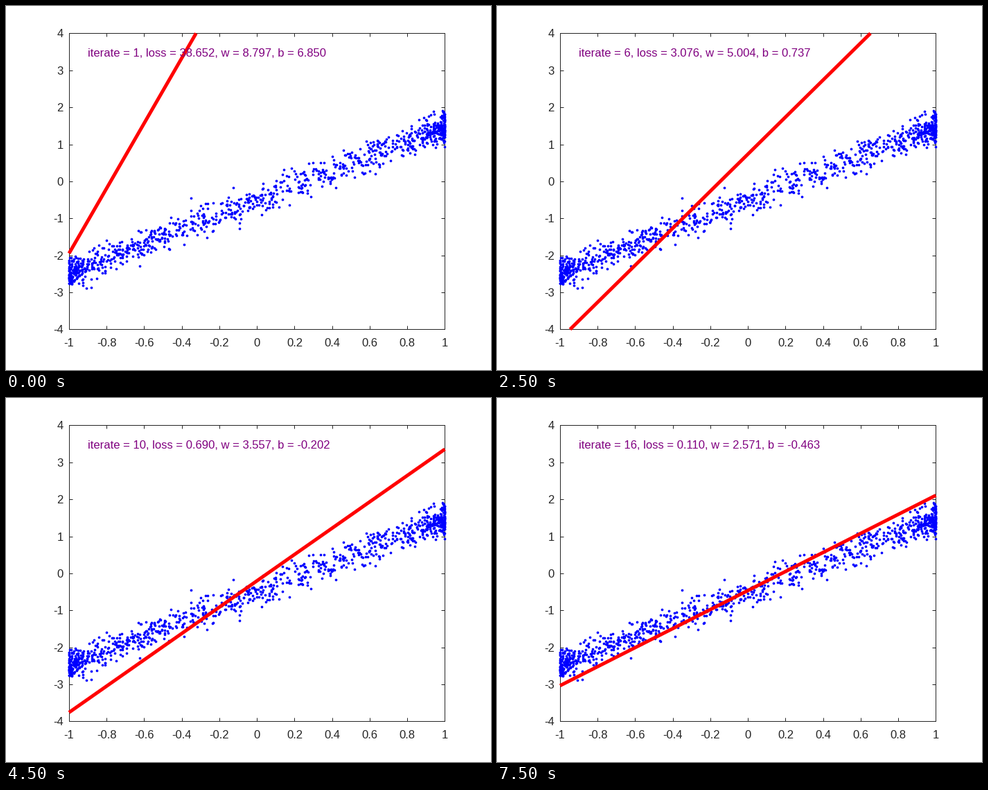
A matplotlib script for the animation above (8 s loop, 700x525 px).

```python
import numpy as np
import matplotlib.pyplot as plt
from matplotlib.animation import FuncAnimation

plt.rcParams["font.family"] = "Liberation Sans"

W, H, DPI = 700, 525, 100
PX = 72 / DPI  # points per pixel
LEFT, TOP, AX_W, AX_H = 91, 39.4, 542.4, 427
INK = "#262626"
FONT = 12
STEPS = 16

# Least-squares optimum and statistics of the cloud
W_OPT, B_OPT = 1.9730, -0.4981
MEAN_X, MEAN_X2, HALF_VAR = 0.0001, 0.4994, 0.0197
DECAY_W, DECAY_B, RATE = 0.8502, 0.7, 0.3


def descend(n):
    """Gradient descent on the halved mean squared error."""
    ew, eb = 6.824, 7.3484
    path = []
    for _ in range(n):
        loss = (eb**2 + MEAN_X2 * ew**2) / 2 + MEAN_X * eb * ew + HALF_VAR
        path.append((loss, W_OPT + ew, B_OPT + eb))
        ew, eb = (DECAY_W * ew - RATE * MEAN_X * eb,
                  DECAY_B * eb - RATE * MEAN_X * ew)
    return path


def cloud(n=1000):
    rng = np.random.default_rng(12)
    x = np.sin(rng.uniform(-np.pi, np.pi, n))
    noise = rng.normal(0, np.sqrt(2 * HALF_VAR), n)
    return x, W_OPT * x + B_OPT + noise


def clip_line(w, b):
    x = np.clip([(-4 - b) / w, (4 - b) / w], -1, 1)
    return x, w * x + b


def label(x, y, s, **kw):
    """Text with its baseline at a pixel position from the top left."""
    return fig.text(x / W, 1 - y / H, s, fontsize=FONT, va="baseline", **kw)


fig = plt.figure(figsize=(W / DPI, H / DPI), dpi=DPI, facecolor="white")
ax = fig.add_axes([LEFT / W, 1 - (TOP + AX_H) / H, AX_W / W, AX_H / H])
ax.set(xlim=(-1, 1), ylim=(-4, 4))
xticks = np.arange(-5, 6) / 5
yticks = np.arange(-4, 5)
ax.set_xticks(xticks)
ax.set_yticks(yticks)
ax.tick_params(direction="in", length=5.4 * PX, width=PX, color=INK,
               top=True, right=True, labelbottom=False, labelleft=False)
for spine in ax.spines.values():
    spine.set(linewidth=PX, edgecolor=INK)

for t in xticks:
    label(LEFT + AX_W * (t + 1) / 2, 491, f"{t:g}", ha="center", color=INK)
for t in yticks:
    label(83, TOP + AX_H * (4 - t) / 8 + 6, f"{t:d}", ha="right", color=INK)

ax.plot(*cloud(), "o", color="blue", ms=3.7 * PX, mew=0,
        clip_on=False, zorder=3)
fit, = ax.plot([], [], color="red", lw=5 * PX, solid_capstyle="butt",
               clip_on=False, zorder=4)
status = label(118, 73, "", ha="left", color="#800080", zorder=5)

path = descend(STEPS)


def update(i):
    loss, w, b = path[i]
    fit.set_data(*clip_line(w, b))
    status.set_text(
        f"iterate = {i + 1}, loss = {loss:.3f}, w = {w:.3f}, b = {b:.3f}")
    return fit, status


anim = FuncAnimation(fig, update, frames=STEPS, interval=500,
                     repeat=True, repeat_delay=0)
plt.show()
```
